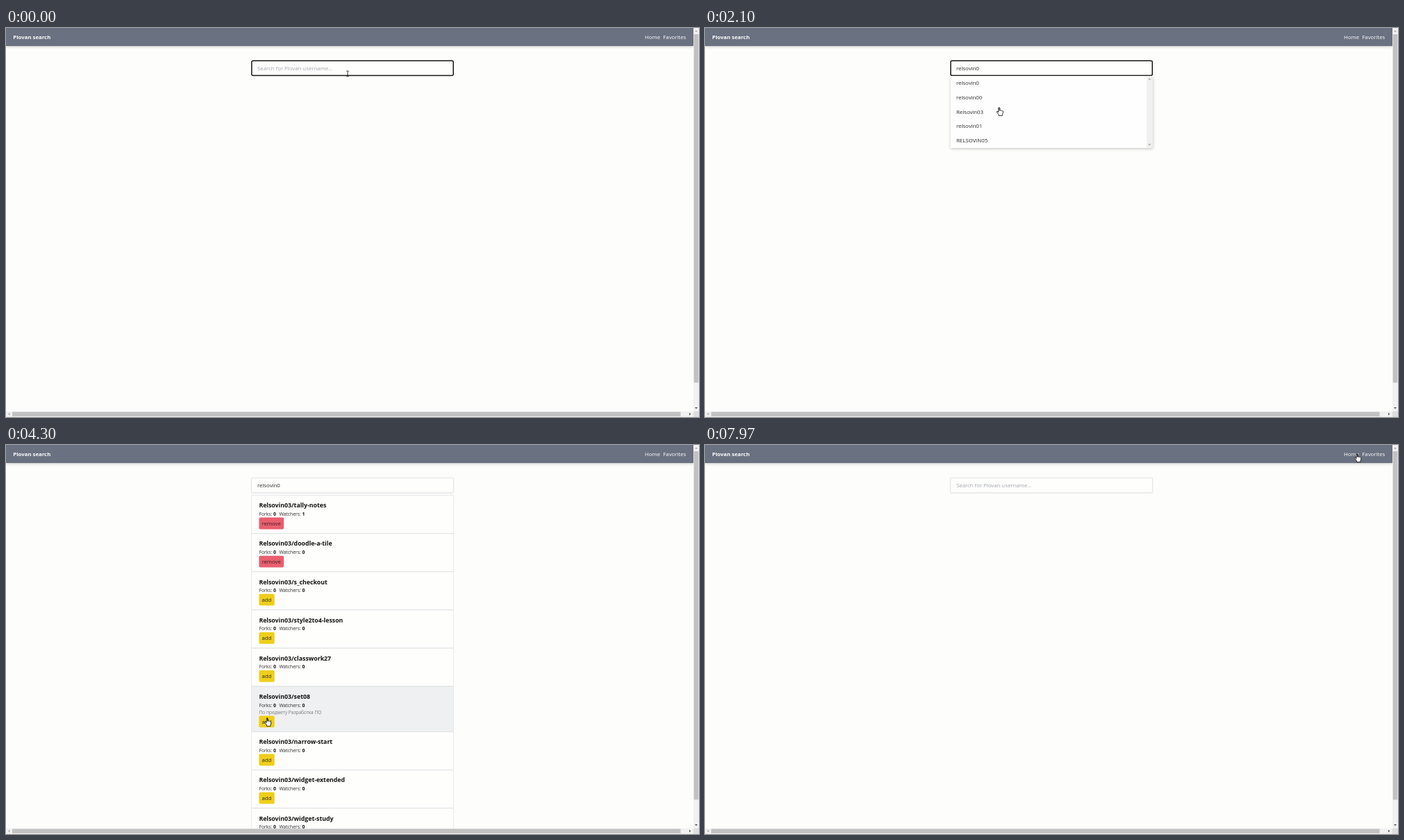
These frames come from a looping animation (998x561 px, 8000 ms). An HTML page with a canvas:

```html
<!DOCTYPE html>
<html lang="en">
<head>
<meta charset="utf-8">
<title>Profile search</title>
<style>
html, body { margin: 0; width: 100%; height: 100%; overflow: hidden; background: #fdfdfc; }
canvas { display: block; width: 998px; height: 561px; }
</style>
</head>
<body>
<canvas id="stage" width="998" height="561"></canvas>
<script>
const ctx = document.getElementById('stage').getContext('2d');
const LOOP = 8000;
const FAMILY = '"Open Sans", "Noto Sans", sans-serif';
const BODY = 7.8, SMALL = 6.8, TITLE = 8.75;
const INK = '#2b2b2e', PAGE = '#fdfdfc';

const QUERY = 'relsovin0';
const OWNER = 'Relsovin03';
const USERS = ['relsovin0', 'relsovin00', 'Relsovin03', 'relsovin01', 'RELSOVIN05'];

// Times of the user's actions
const TYPE_START = 700, TYPE_END = 1300, SUGGEST = 1400;
const PICK = 2240, FAVORITES = 5740, HOME = 7850;
const DRAG_START = 6500, DRAG_END = 7000;

const REPOS = [
  { name: 'tally-notes', watchers: 1, added: 3020 },
  { name: 'doodle-a-tile', added: 3640 },
  { name: 's_checkout' },
  { name: 'style2to4-lesson' },
  { name: 'classwork27' },
  { name: 'set08', note: 'По предмету Разработка ПО', added: 4340 },
  { name: 'narrow-start' },
  { name: 'widget-extended' },
  { name: 'widget-study' }
];
let nextTop = 72.7;
for (const repo of REPOS) {
  repo.top = nextTop;
  repo.height = repo.note ? 65.5 : 55.1;
  nextTop += repo.height;
}
const LINKS = REPOS.filter(r => r.added).map(r => `https://plovan.test/${OWNER}/${r.name}`);

// Pointer path: time, x, y of the hot spot, shape until the next point
const PATH = [
  [0, 492, 66, 'beam'],
  [1530, 492, 66, 'beam'],
  [1720, 468.5, 73, 'hand'],
  [1900, 468.5, 73, 'hand'],
  [2140, 420, 118, 'hand'],
  [2320, 420, 118, 'arrow'],
  [2640, 386, 112, 'hand'],
  [3140, 386, 112, 'arrow'],
  [3400, 377, 166, 'hand'],
  [3720, 377, 166, 'arrow'],
  [4150, 376, 394, 'hand'],
  [4450, 376, 394, 'arrow'],
  [4800, 768, 180, 'arrow'],
  [5250, 958, 18.5, 'arrow'],
  [5330, 958, 18.5, 'arrow'],
  [5480, 960, 13, 'hand'],
  [5800, 960, 13, 'arrow'],
  [6200, 640, 95, 'arrow'],
  [6440, 553, 79, 'beam'],
  [6500, 553, 79, 'beam'],
  [6690, 400, 63, 'arrow'],
  [6750, 400, 63, 'arrow'],
  [6920, 330, 40, 'arrow'],
  [7040, 330, 40, 'arrow'],
  [7310, 904, 45, 'arrow'],
  [7560, 939, 13, 'hand'],
  [8000, 939, 13, 'hand']
];

function pointerAt(t) {
  let i = 0;
  while (i < PATH.length - 2 && PATH[i + 1][0] <= t) i++;
  const [t0, x0, y0, shape] = PATH[i], [t1, x1, y1] = PATH[i + 1];
  const p = Math.min(1, (t - t0) / (t1 - t0));
  const e = p * p * (3 - 2 * p);
  return { x: x0 + (x1 - x0) * e, y: y0 + (y1 - y0) * e, shape };
}

function setFont(size, weight = 400) {
  ctx.font = `${weight} ${size}px ${FAMILY}`;
}

function text(str, x, y, size = BODY, color = INK, weight = 400) {
  setFont(size, weight);
  ctx.fillStyle = color;
  ctx.fillText(str, x, y);
}

function rect(x, y, w, h, color) {
  ctx.fillStyle = color;
  ctx.fillRect(x, y, w, h);
}

function roundBox(x, y, w, h, r, fill, stroke, line = 1) {
  ctx.beginPath();
  ctx.roundRect(x, y, w, h, r);
  if (fill) { ctx.fillStyle = fill; ctx.fill(); }
  if (stroke) { ctx.strokeStyle = stroke; ctx.lineWidth = line; ctx.stroke(); }
}

function withShadow(color, blur, dy, draw) {
  ctx.save();
  ctx.shadowColor = color;
  ctx.shadowBlur = blur;
  ctx.shadowOffsetY = dy;
  draw();
  ctx.restore();
}

function triangle(x, y, angle, color) {
  ctx.save();
  ctx.translate(x, y);
  ctx.rotate(angle);
  ctx.beginPath();
  ctx.moveTo(-2, 1);
  ctx.lineTo(2, 1);
  ctx.lineTo(0, -1.2);
  ctx.fillStyle = color;
  ctx.fill();
  ctx.restore();
}

function drawHeader() {
  withShadow('rgba(0,0,0,0.22)', 4, 1, () => rect(0, 0, 990, 26, '#6a7180'));
  text('Plovan search', 10.3, 16.2, BODY, '#fff', 700);
  text('Home', 920, 16.2, BODY, '#fff');
  text('Favorites', 946.3, 16.2, BODY, '#fff');
}

function drawScrollbars() {
  rect(990, 0, 8, 553, '#f1f1f1');
  rect(0, 553, 990, 8, '#f1f1f1');
  rect(990, 553, 8, 8, '#dedede');
  rect(990.7, 9, 6.6, 502.5, '#c1c1c1');
  rect(9, 553.6, 962.5, 6.4, '#c1c1c1');
  triangle(994, 4.5, 0, '#a3a3a3');
  triangle(994, 548, Math.PI, '#505050');
  triangle(4.3, 556.8, -Math.PI / 2, '#a3a3a3');
  triangle(985, 556.8, Math.PI / 2, '#505050');
}

function drawInput(value, focused) {
  if (focused) {
    roundBox(353.8, 47.3, 290.4, 21.2, 2, '#fefefd', '#151515', 1.5);
  } else {
    withShadow('rgba(0,0,0,0.08)', 2, 0.5, () =>
      roundBox(353.5, 47.2, 291, 21.6, 1, '#fefefd', '#e3e4e6', 0.8));
  }
  if (value) text(value, 362, 61.3);
  else text('Search for Plovan username...', 362, 61.3, BODY, '#a0a3a9');
}

function drawSuggestions() {
  withShadow('rgba(0,0,0,0.25)', 4, 1.2, () => rect(353.5, 69.3, 291, 103.7, '#fefefe'));
  USERS.forEach((name, i) => text(name, 362, 82 + i * 20.8));
  rect(636, 69.3, 8.4, 103.4, '#f0f0ef');
  triangle(640.2, 73.4, 0, '#a3a3a3');
  triangle(640.2, 168.2, Math.PI, '#a3a3a3');
}

function drawCard(repo, t, pointer) {
  const { top, height } = repo;
  const hover = pointer.y >= top && pointer.y < top + height && pointer.x > 353 && pointer.x < 645;
  rect(353.5, top, 291, height, hover ? '#eff0f2' : '#fefefd');
  ctx.strokeStyle = '#e1e3e7';
  ctx.lineWidth = 0.8;
  ctx.strokeRect(353.7, top, 290.6, height);
  rect(353.5, top + height - 0.6, 291, 1, '#dadce1');

  text(`${OWNER}/${repo.name}`, 364.4, top + 17.6, TITLE, '#111', 700);
  text('Forks:', 364.4, top + 29.3, SMALL);
  text('0', 385, top + 29.3, SMALL, '#111', 700);
  text('Watchers:', 393.4, top + 29.3, SMALL);
  text(String(repo.watchers || 0), 426.6, top + 29.3, SMALL, '#111', 700);
  if (repo.note) text(repo.note, 364.4, top + 39.6, SMALL, '#3a3a3c', 300);

  const y = top + height - 23.2;
  const added = t >= repo.added;
  roundBox(364.4, y, added ? 35.7 : 22.3, 16.8, 2, added ? '#e95f6f' : '#efce1b');
  text(added ? 'remove' : 'add', 368.4, y + 11.1, BODY, added ? '#3c1c22' : INK);
}

function drawFavorites(t) {
  const left = 417, rowHeight = 12.5, firstTop = 47;
  const rowOf = y => Math.max(0, Math.min(2, Math.floor((y - firstTop) / rowHeight)));
  const drag = t >= DRAG_START ? pointerAt(Math.min(t, DRAG_END)) : null;
  const focusRow = drag ? rowOf(drag.y) : LINKS.length;

  LINKS.forEach((link, i) => {
    const top = firstTop + i * rowHeight;
    const baseline = top + 9.2;
    text(link, left, baseline);
    if (i < focusRow) return;
    const end = left + ctx.measureText(link).width + (i < LINKS.length - 1 ? 2 : 0);
    const start = i === focusRow ? Math.min(end, Math.max(left, drag.x)) : left;
    ctx.save();
    ctx.beginPath();
    ctx.rect(start, top, end - start, rowHeight);
    ctx.clip();
    rect(start, top, end - start, rowHeight, '#388ff6');
    text(link, left, baseline, BODY, '#fff');
    ctx.restore();
  });
}

const SHAPES = {
  arrow: new Path2D('M0 0V8.6L2 6.8L3.4 9.8L4.8 9.2L3.5 6.3H6.2Z'),
  hand: new Path2D('M-.9 .6Q0-.7 .9 .6V4.3Q2-.0 0 0M-.9 .6V6.6L-2.4 5.4Q-3.6 5.2-3.2 6.4L-.5 10V11.6H4.8V10Q6 8.4 5.9 5.2Q5.4 4.2 4.5 4.8Q4 3.7 2.8 4.3Q2 3.3 .9 4V.6Q0-.7-.9 .6Z'),
  beam: new Path2D('M-1.8-4Q-.4-4 0-3.5Q.4-4 1.8-4M0-3.5V3.5M-1.8 4Q-.4 4 0 3.5Q.4 4 1.8 4')
};

function drawPointer({ x, y, shape }) {
  ctx.save();
  ctx.translate(x, y);
  ctx.lineJoin = 'round';
  ctx.lineWidth = 0.9;
  ctx.strokeStyle = '#1c1c1c';
  if (shape !== 'beam') {
    ctx.fillStyle = '#fff';
    ctx.fill(SHAPES[shape]);
  }
  ctx.stroke(SHAPES[shape]);
  ctx.restore();
}

function drawSearch(t, pointer) {
  const typed = Math.ceil((t - TYPE_START) / (TYPE_END - TYPE_START) * QUERY.length);
  const value = t < HOME ? QUERY.slice(0, Math.max(0, typed)) : '';
  drawInput(value, t < PICK);
  if (t >= SUGGEST && t < PICK) drawSuggestions();
  if (t >= PICK && t < FAVORITES) {
    for (const repo of REPOS) drawCard(repo, t, pointer);
    // Edge of the focus ring that lingers for a moment
    if (t < 3170) rect(643.9, 47, 1, 25.7, '#333');
  }
}

function frame() {
  const t = performance.now() % LOOP;
  const pointer = pointerAt(t);
  rect(0, 0, 998, 561, PAGE);
  if (t >= FAVORITES && t < HOME) drawFavorites(t);
  else drawSearch(t, pointer);
  drawHeader();
  drawScrollbars();
  drawPointer(pointer);
  requestAnimationFrame(frame);
}
frame();
</script>
</body>
</html>
```
